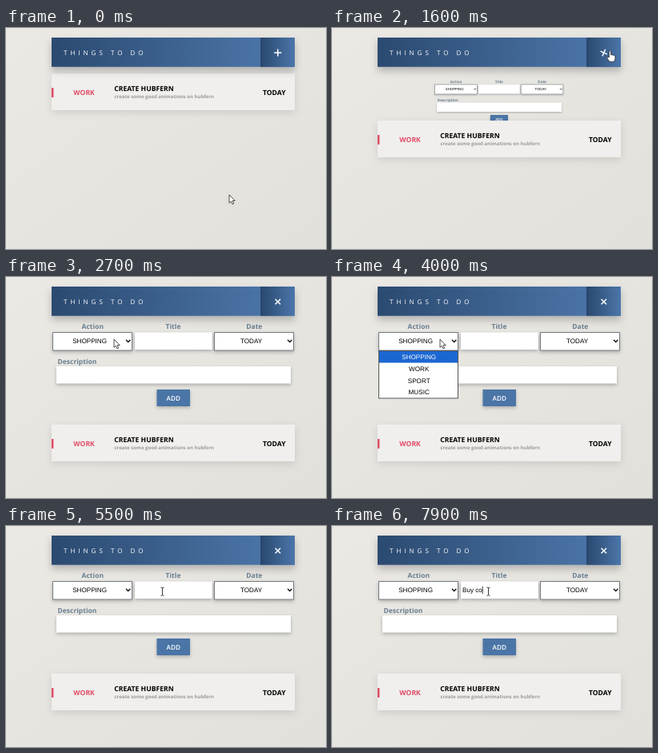
These frames come from a looping animation (400 by 277 pixels, 8 s). An HTML page:

```html
<!DOCTYPE html>
<html lang="en">
<head>
<meta charset="utf-8">
<title>Things to do</title>
<style>
  html, body { margin: 0; width: 100%; height: 100%; overflow: hidden; background: #e7e5e1; }
  svg { display: block; width: 100vw; height: 100vh; text-rendering: geometricPrecision; }
  text { font: 700 8.6px "Open Sans", sans-serif; }
  .mid { text-anchor: middle; }
  .title { font-weight: 400; font-size: 8px; letter-spacing: 4px; fill: #fff; }
  .sub { font-size: 6.05px; fill: #9c9b99; }
  .label { font-size: 8.5px; fill: #687f90; }
  .ui { font: 400 8.15px "Liberation Sans", Arial, sans-serif; }
  .low { filter: drop-shadow(0 2px 2px rgba(50, 55, 60, .32)); }
  .card { filter: drop-shadow(0 3px 5px rgba(60, 60, 60, .15)); }
  .high { filter: drop-shadow(0 5px 5px rgba(60, 65, 70, .32)); }
</style>
</head>
<body>
<svg viewBox="0 0 400 277" preserveAspectRatio="none">
  <defs>
    <linearGradient id="paper" x2="1" y2="1">
      <stop stop-color="#ece9e5"/><stop offset="1" stop-color="#e1e0da"/>
    </linearGradient>
    <linearGradient id="bar"><stop stop-color="#2b4a70"/><stop offset="1" stop-color="#4f7aae"/></linearGradient>
    <linearGradient id="toggle"><stop stop-color="#29486e"/><stop offset="1" stop-color="#4b76aa"/></linearGradient>
    <g id="select">
      <rect class="low" x=".5" y=".5" width="99" height="22.5" fill="#fff" stroke="#777c80"/>
      <path d="M92 9.7l2.7 2.8 2.7-2.8" fill="none" stroke="#111" stroke-width="1.4"/>
    </g>
  </defs>
  <rect width="400" height="277" fill="url(#paper)"/>

  <g id="form">
    <text class="label mid" x="108.3" y="65">Action</text>
    <text class="label mid" x="209" y="65">Title</text>
    <text class="label mid" x="310.3" y="65">Date</text>
    <use href="#select" x="58" y="69"/>
    <use href="#select" x="260" y="69"/>
    <text class="ui mid" x="104.6" y="83.2">SHOPPING</text>
    <text class="ui mid" x="306.5" y="83.2">TODAY</text>
    <rect class="low" x="161" y="69.5" width="96.7" height="21.5" fill="#fff"/>
    <text class="label" x="64.5" y="108.6">Description</text>
    <rect class="low" x="63" y="112" width="293" height="21.5" fill="#fff"/>
    <rect class="low" x="188.5" y="141" width="41.5" height="21" fill="#4a75a6"/>
    <text class="mid" x="209.2" y="154.6" fill="#fff" style="font-size:8.2px;font-weight:600">ADD</text>
  </g>
  <text class="ui" id="typed" x="163" y="83.2"></text>
  <path id="caret" d="M0 75.5V85" stroke="#000" stroke-width=".8"/>

  <g id="item">
    <rect class="card" x="57" y="57" width="304" height="46" fill="#f0efed"/>
    <rect x="57" y="75" width="2.4" height="12" fill="#e24a65"/>
    <text class="mid" x="97.6" y="84" fill="#e24a65">WORK</text>
    <text x="135.3" y="79">CREATE HUBFERN</text>
    <text class="sub" x="135.5" y="88">create some good animations on hubfern</text>
    <text x="349.5" y="84" text-anchor="end">TODAY</text>
  </g>

  <g class="high">
    <rect x="57" y="12" width="304" height="36.7" fill="url(#bar)"/>
    <rect x="318" y="12" width="43" height="36.7" fill="url(#toggle)"/>
  </g>
  <text class="title" x="72" y="34">THINGS TO DO</text>
  <path id="plus" d="M-4.6 0H4.6M0 -4.6V4.6" stroke="#fff" stroke-width="1.5"/>

  <g id="menu"></g>

  <path id="arrow" d="M0 0V10.3L2.3 8.2 4 11.9 5.7 11.1 4.1 7.5H7.2Z" fill="#fff" stroke="#222" stroke-width=".8"/>
  <path id="hand" d="M-1.2 8V.8Q0-.8 1.2.8V5Q2.4 4 3.2 5.4 4.4 4.6 5 5.9 6.4 5.4 6.5 7V10L5.2 13.5H-.5L-3.6 9.3Q-3.7 7.4-2.4 7.7Z"
        fill="#fff" stroke="#222" stroke-width=".8" stroke-linejoin="round"/>
  <path id="beam" d="M-2-5Q0-5 0-4 0-5 2-5M0-4V4.5M-2 5.3Q0 5.3 0 4.5 0 5.3 2 5.3" fill="none" stroke="#222" stroke-width=".9"/>
</svg>
<script>
const LOOP = 8000, STEP = 100;
const el = id => document.getElementById(id);
const clamp = v => Math.min(1, Math.max(0, v));
const show = (node, on) => node.setAttribute('display', on ? 'inline' : 'none');
const move = (node, value) => node.setAttribute('transform', value);

el('menu').innerHTML =
  '<rect x="58.5" y="92.5" width="99" height="59.5" fill="#fff" stroke="#555"/>' +
  '<rect x="59" y="93" width="98" height="14.5" fill="#1b67d2"/>' +
  ['SHOPPING', 'WORK', 'SPORT', 'MUSIC'].map((name, i) =>
    `<text class="ui mid" x="108.7" y="${103.3 + 14.6 * i}" fill="${i ? '#000' : '#fff'}">${name}</text>`).join('');

// cubic-bezier(.25, .1, .25, 1)
function ease(x) {
  if (x <= 0 || x >= 1) return clamp(x);
  const axis = (a, b, u) => 3 * a * u * (1 - u) ** 2 + 3 * b * u * u * (1 - u) + u ** 3;
  let lo = 0, hi = 1;
  for (let i = 0; i < 24; i++) {
    const u = (lo + hi) / 2;
    if (axis(.25, .25, u) < x) lo = u; else hi = u;
  }
  return axis(.1, 1, lo);
}

// time, x, y of the pointer's hot spot
const route = [
  [0, 279, 209], [100, 375, 120], [200, 346, 75], [300, 346, 75], [800, 347.5, 28.7],
  [1600, 347.5, 28.7], [1900, 347, 28.7], [2100, 347, 28.7], [2600, 135, 78],
  [4800, 135, 78], [5400, 195.5, 82], [LOOP, 195.5, 82]
];

function pointerAt(t) {
  const i = route.findIndex((stop, n) => n && t <= stop[0]);
  const [t0, x0, y0] = route[i - 1], [t1, x1, y1] = route[i];
  const k = clamp((t - t0) / (t1 - t0)), s = k * k * (3 - 2 * k);
  return [x0 + (x1 - x0) * s, y0 + (y1 - y0) * s];
}

const phrase = 'Buy co', keyTimes = [7000, 7300, 7500, 7600, 7700, 7900];

function draw(t) {
  const slide = ease((t - 1460) / 510), scale = ease((t - 1442) / 510);
  const originY = 49 + 51 * slide;
  move(el('item'), `translate(0 ${128 * slide})`);
  move(el('form'), `translate(208.5 ${originY}) scale(${scale}) translate(-208.5 ${-originY})`);
  show(el('form'), scale > 0);
  move(el('plus'), `translate(339.8 31) rotate(${45 * scale})`);
  show(el('menu'), t >= 3800 && t < 4600);

  const count = keyTimes.filter(k => t >= k).length;
  const typed = el('typed');
  typed.textContent = phrase.slice(0, count);
  typed.style.whiteSpace = 'pre';
  move(el('caret'), `translate(${163.4 + (count ? typed.getComputedTextLength() : 0)} 0)`);
  show(el('caret'), t >= 6000 && (t >= 7000 || t % 1000 < 500));

  const [x, y] = pointerAt(t);
  const kind = x > 318 && x < 361 && y < 49 ? 'hand' : t > 4800 && x > 161 ? 'beam' : 'arrow';
  for (const id of ['arrow', 'hand', 'beam']) {
    show(el(id), id === kind);
    move(el(id), `translate(${x} ${y})`);
  }
}

const start = performance.now();
function tick() {
  const t = (performance.now() - start) % LOOP;
  draw(Math.floor(t / STEP) * STEP);
  requestAnimationFrame(tick);
}
tick();
</script>
</body>
</html>
```
